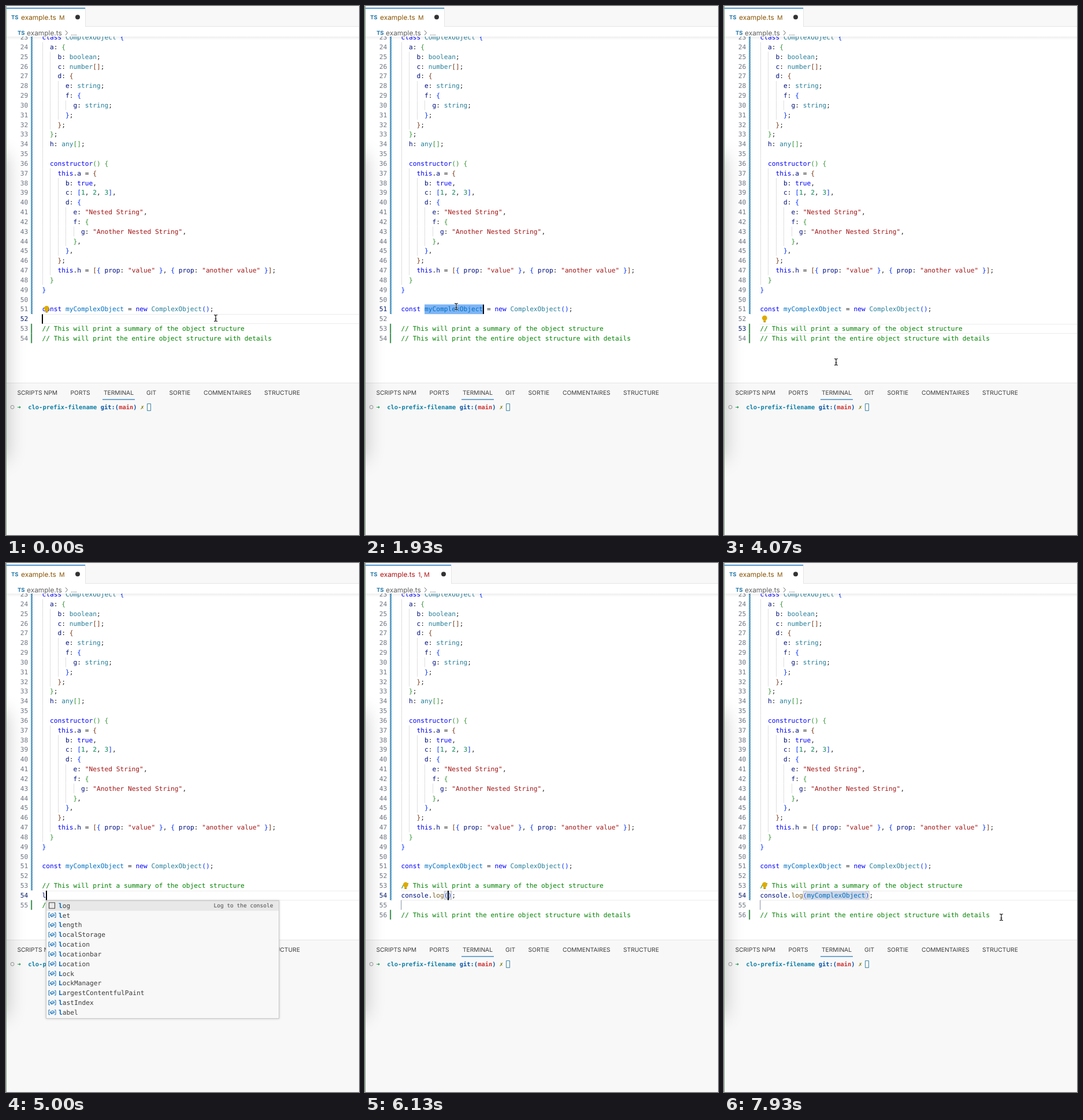
An HTML page with a canvas that plays this animation: 611 by 917 pixels, repeating every 8000 ms.

```html
<!DOCTYPE html>
<html lang="en">
<head>
<meta charset="utf-8">
<title>Editor log snippet</title>
<style>
html, body { margin: 0; width: 100%; height: 100%; overflow: hidden; background: #fff; }
canvas { display: block; }
</style>
</head>
<body>
<canvas id="stage" width="611" height="917"></canvas>
<script>
const ctx = document.getElementById('stage').getContext('2d');
const LOOP = 8000, W = 611, H = 917;
const LEFT = 62.6, CHAR = 6.745, ROW = 16.833;
const MONO = '"DejaVu Sans Mono", monospace', SANS = 'Inter, sans-serif';
const CODE = `11.2px ${MONO}`;

const head = `class ComplexObject {
  a: {
    b: boolean;
    c: number[];
    d: {
      e: string;
      f: {
        g: string;
      };
    };
  };
  h: any[];

  constructor() {
    this.a = {
      b: true,
      c: [1, 2, 3],
      d: {
        e: "Nested String",
        f: {
          g: "Another Nested String",
        },
      },
    };
    this.h = [{ prop: "value" }, { prop: "another value" }];
  }
}

const myComplexObject = new ComplexObject();
`.split('\n');
const FIRST = 23;
const summary = '// This will print a summary of the object structure';
const details = '// This will print the entire object structure with details';

// Times of the visible events, in ms
const SELECT = 1670, CLICK = 3530, ENTER = 4400, ACCEPT = 5830, PASTE = 6200;

const typed = [[0, ''], [4930, 'l'], [5070, 'lo'], [5230, 'log'],
  [ACCEPT, 'console.log();'], [PASTE, 'console.log(myComplexObject);']];
const activeLine = [[0, 52], [SELECT, 51], [CLICK, 53], [ENTER, 54]];
const bulbLine = [[0, 51], [130, 0], [1950, 50], [CLICK, 0], [4070, 52], [4670, 0], [6060, 53]];
const hatchEnd = [[0, 51], [4700, 53], [5900, 54]];
const caret = [[0, 52, 0], [330], [865, 52, 0], [1400], [SELECT, 51, 21], [2200], [2735, 51, 21], [3270],
  [CLICK, 53, 52], [4070], [ENTER, 54, 0], [4930, 54, 1], [5070, 54, 2], [5230, 54, 3],
  [ACCEPT, 54, 12], [PASTE, 54, 27], [6730], [7265, 54, 27], [7800]];
const pointer = [
  [[0, 363, 541], [530, 363, 541], [700, 320, 524], [900, 222, 503], [1130, 159, 519], [1330, 158, 521],
   [2470, 158, 521], [2670, 168, 542], [2880, 290, 588], [3130, 427, 566], [3330, 424, 560],
   [3600, 420, 560], [3930, 194, 617], [ENTER, 194, 617]],
  [[7000, 194, 617], [7270, 218, 640], [7470, 320, 647], [7700, 440, 638], [7870, 485, 623],
   [7930, 480, 614], [LOOP, 480, 614]]
];
const suggestions = {
  l: ['log', 'let', 'length', 'localStorage', 'location', 'locationbar', 'Location', 'Lock',
    'LockManager', 'LargestContentfulPaint', 'lastIndex', 'label'],
  lo: ['log', 'localStorage', 'location', 'locationbar', 'Location', 'Lock', 'LockManager'],
  log: ['log', 'localStorage', 'LockManager']
};

const at = (table, t) => table.findLast(row => row[0] <= t);
const centre = n => 71 + (n - 24) * ROW;
const col = c => LEFT + c * CHAR;

function rect(x, y, w, h, color) {
  ctx.fillStyle = color;
  ctx.fillRect(x, y, w, h);
}
function text(str, x, y, color, font) {
  ctx.font = font;
  ctx.fillStyle = color;
  ctx.fillText(str, x, y);
}
function disc(x, y, r, color) {
  ctx.fillStyle = color;
  ctx.beginPath();
  ctx.arc(x, y, r, 0, 7);
  ctx.fill();
}
function stroke(path, color, width) {
  ctx.strokeStyle = color;
  ctx.lineWidth = width;
  ctx.stroke(new Path2D(path));
}

const styles = [
  [/^\/\//, '#008000'], [/^"/, '#a31515'], [/^\d/, '#098658'],
  [/^(class|const|new|constructor|this|true)$/, '#0000ff'],
  [/^(boolean|number|string|any|ComplexObject)$/, '#267f99'],
  [/^myComplexObject$/, '#0070c1'], [/^[a-z]/i, '#001080']
];
const brackets = ['#0431fa', '#319331', '#7b3814'];

function drawCode(line, y, depth) {
  for (const m of line.matchAll(/\/\/.*|"[^"]*"|\w+|[^\s\w]/g)) {
    const token = m[0];
    let color = styles.find(([re]) => re.test(token))?.[1] ?? '#222';
    if (/^[[{(]$/.test(token)) color = brackets[depth++ % 3];
    if (/^[\]})]$/.test(token)) color = brackets[--depth % 3];
    if (token === 'log' && line[m.index - 1] === '.') color = '#795e26';
    text(token, col(m.index), y, color, CODE);
  }
  return depth;
}

function drawBulb(n) {
  const y = centre(n);
  disc(70.3, y - 1.4, 4.4, '#ddab00');
  rect(68.2, y + 1.5, 4.2, 3, '#ddab00');
  rect(68.4, y + 4.6, 3.8, 1.3, '#a88100');
}

function variableIcon(x, y) {
  ctx.save();
  ctx.translate(x, y);
  stroke('M-4-4H-6V4H-4M4-4H6V4H4', '#1270b8', 1);
  stroke('M-3.5 1V-.5L1-3 3.5-1V.8L-1 3ZM-3.5-.5L-1 1 3.5-1M-1 1V3', '#1270b8', 1);
  ctx.restore();
}

function drawEditor(t) {
  const body = at(typed, t)[1], active = at(activeLine, t)[1];
  const lines = [...head, summary];
  if (t >= ENTER) lines.push(body);
  if (t >= ACCEPT) lines.push('');
  lines.push(details);
  const last = FIRST + lines.length - 1;
  const selecting = t >= SELECT && t < CLICK;

  ctx.save();
  ctx.beginPath();
  ctx.rect(0, 53, W, 600);
  ctx.clip();

  if (!selecting) {
    const top = Math.round(centre(active) - 8.4);
    rect(62, top, W, 1, '#ececec');
    rect(62, top + 16, W, 1, '#ececec');
  } else {
    rect(col(6), centre(51) - 8.2, 15 * CHAR, ROW, '#7fb5f5');
  }
  if (t >= ACCEPT) {
    const y = centre(54) - 7.5, close = body.length - 2;
    if (t >= PASTE) rect(col(12), y, 15 * CHAR, 15, '#cdd6e8');
    for (const c of [11, close]) {
      rect(col(c), y, CHAR, 15, '#b9b9b9');
      rect(col(c) + 1, y + 1, CHAR - 2, 13, '#f0f3f0');
    }
    rect(62, centre(55) - 8.4, 1.2, ROW, '#98a2b5');
  }

  let depth = 0;
  lines.forEach((line, i) => {
    const n = FIRST + i, y = centre(n);
    const indent = n === 35 ? 2 : line.search(/\S/);
    for (let c = 0; c < indent; c += 2) rect(Math.round(col(c)), y - 8.4, 1, ROW, '#dedede');
    text(n, 24.8, y + 4, n === active ? '#0b216f' : '#6e7681', CODE);
    depth = drawCode(line, y + 4, depth);
  });
  if (t >= 2250 && t < 2800) {
    text('myComplexObject', col(6), centre(51) + 4, '#0037d8', CODE);
    rect(col(6), centre(51) + 5.5, 15 * CHAR, 1, '#0037d8');
  }

  const end = centre(at(hatchEnd, t)[1]) + 8.4;
  ctx.save();
  ctx.beginPath();
  ctx.rect(43, 53, 3, end - 53);
  ctx.clip();
  let hatch = '';
  for (let y = 50; y < end + 4; y += 3) hatch += `M42 ${y}l5 5`;
  stroke(hatch, '#1675ad', 1.5);
  ctx.restore();
  const green = n => rect(43, centre(n) - 8.4, 2.2, ROW, '#48985d');
  green(last);
  if (t < 4700) green(53);

  const bulb = at(bulbLine, t)[1];
  if (bulb) drawBulb(bulb);

  const [, line, column] = at(caret, t);
  if (line) rect(Math.round(col(column) - .4), centre(line) - 8, 2, 16.4, '#000');

  const fade = ctx.createLinearGradient(0, 53, 0, 59);
  fade.addColorStop(0, '#0001');
  fade.addColorStop(1, '#0000');
  rect(0, 53, W, 6, fade);
  ctx.restore();
}

function drawTabs(t) {
  const failing = t >= 5600 && t < 6530;
  const edge = failing ? 149 : 137, color = failing ? '#b01011' : '#895503';
  rect(0, 0, W, 36, '#f8f8f8');
  rect(0, 3, edge, 33, '#fff');
  rect(0, 3, edge, 1.6, '#2b7fc3');
  rect(edge, 3, 1, 33, '#e5e5e5');
  rect(edge, 35, W, 1, '#e5e5e5');
  text('TS', 9, 23, '#2378a8', `bold 9.5px ${SANS}`);
  text('example.ts', 26, 24, color, `11.9px ${SANS}`);
  text(failing ? '1, M' : 'M', 92, 23.5, color, `10.6px ${SANS}`);
  disc(edge - 13, 19.3, 4, '#333');

  text('TS', 20, 50, '#2378a8', `bold 9.5px ${SANS}`);
  text('example.ts', 36, 50.5, '#616161', `11.9px ${SANS}`);
  stroke('M103 42.5l3.5 4-3.5 4', '#616161', 1);
  if (t >= 2000 && t < 4070) {
    variableIcon(120, 46.5);
    text('myComplexObject', 130, 50.5, '#616161', `11.9px ${SANS}`);
  } else {
    text('...', 112.5, 50.5, '#616161', `11.9px ${SANS}`);
  }
}

function drawPanel() {
  rect(0, 653, W, H - 653, '#f8f8f8');
  rect(0, 653, W, 1, '#e5e5e5');
  const labels = [['SCRIPTS NPM', 19.5], ['PORTS', 111.5], ['TERMINAL', 169], ['GIT', 243],
    ['SORTIE', 282.5], ['COMMENTAIRES', 342], ['STRUCTURE', 447]];
  for (const [label, x] of labels) text(label, x, 674, '#3b3b3b', `10.25px ${SANS}`);
  rect(167, 681.5, 56, 1.3, '#2b7fc3');

  const bold = `bold 10.42px ${MONO}`, cell = 6.273, y = 699;
  const prompt = [['➜', 0, '#149a4a'], ['clo-prefix-filename', 3, '#0c7fa6'], ['git:(', 23, '#0451a5'],
    ['main', 28, '#cd3131'], [')', 32, '#0451a5'], ['✗', 34, '#7a7a00']];
  for (const [str, c, color] of prompt) text(str, 19.5 + c * cell, y, color, bold);
  ctx.strokeStyle = '#999';
  ctx.lineWidth = 1;
  ctx.beginPath();
  ctx.arc(11, 695.3, 3, 0, 7);
  ctx.stroke();
  stroke('M244.5 689.5h6v12h-6Z', '#3c87a5', 1);
}

function drawSuggestions(t) {
  const word = at(typed, t)[1], items = suggestions[word];
  if (!items || t < 4980) return;
  const x = Math.round(col(word.length)), y = 585, w = 404, h = items.length * ROW + 3;
  ctx.save();
  ctx.shadowColor = '#0003';
  ctx.shadowBlur = 4;
  rect(x, y, w, h, '#c8c8c8');
  ctx.restore();
  rect(x + 1, y + 1, w - 2, h - 2, '#f8f8f8');
  rect(x + 1, y + 1, w - 2, ROW, '#e8e8e8');
  items.forEach((item, i) => {
    const mid = y + 8.7 + i * ROW;
    if (i) variableIcon(x + 11, mid);
    else stroke(`M${x + 5.5} ${mid - 5}h10v10h-10Z`, '#444', 1.1);
    let hit = 0;
    [...item].forEach((letter, c) => {
      const match = letter.toLowerCase() === word[hit];
      if (match) hit++;
      text(letter, x + 22 + c * CHAR, mid + 4, match ? '#0066bf' : '#3b3b3b', match ? `bold ${CODE}` : CODE);
    });
  });
  text('Log to the console', x + 290.5, y + 12, '#4a4a4a', `9.5px ${MONO}`);
}

function drawEdge() {
  ctx.save();
  ctx.shadowColor = 'rgba(0,0,0,.24)';
  ctx.shadowBlur = 32;
  rect(-200, 258, 200, 528, '#000');
  ctx.restore();
  rect(0, 0, 1, H, '#7fa582');
}

function drawPointer(t) {
  const path = pointer.find(p => t >= p[0][0] && t < p.at(-1)[0]);
  if (!path) return;
  const i = path.findIndex(p => p[0] > t);
  const [t0, x0, y0] = path[i - 1], [t1, x1, y1] = path[i];
  const k = (t - t0) / (t1 - t0);
  ctx.save();
  ctx.translate(x0 + (x1 - x0) * k, y0 + (y1 - y0) * k);
  const beam = 'M-3-5.5Q0-5.5 0-4Q0-5.5 3-5.5M0-4V4M-3 5.5Q0 5.5 0 4Q0 5.5 3 5.5M-1.5 1.5H1.5';
  stroke(beam, '#fffc', 2.6);
  stroke(beam, '#111', 1.2);
  ctx.restore();
}

function draw(t) {
  ctx.textRendering = 'geometricPrecision';
  rect(0, 0, W, H, '#fff');
  drawEditor(t);
  drawTabs(t);
  drawPanel();
  drawEdge();
  drawSuggestions(t);
  drawPointer(t);
}

const start = performance.now();
function tick() {
  draw((performance.now() - start) % LOOP);
  requestAnimationFrame(tick);
}
tick();
</script>
</body>
</html>
```
